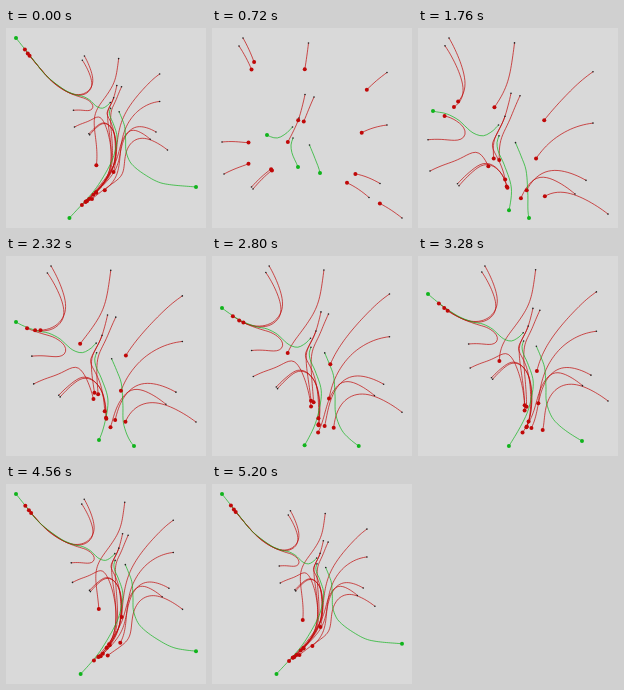
Animation of 200 by 200 pixels, one loop 5.28 s. Source, as an HTML page:

```html
<!DOCTYPE html>
<html lang="en">
<head>
<meta charset="utf-8">
<title>Pursuit and escape</title>
<style>
  html, body { margin: 0; width: 100%; height: 100%; overflow: hidden; background: #d9d9d9; }
  svg { display: block; width: 100%; height: 100%; }
  path { fill: none; stroke-width: .7; }
</style>
</head>
<body>
<svg id="stage" viewBox="0 0 200 200"></svg>
<script>
const STEP_MS = 80, STATES = 66, CHASE_SPEED = 3.32;
const LOW = 10, SPAN = 180;
const RED = '#c00808', GREEN = '#10b41c';

// Escape routes: [step, x, y]
const routes = [
  [[0, 80.5, 99], [2.4, 74, 105.5], [5.1, 65, 110], [8, 55, 107], [10.9, 47, 100], [13.4, 40, 93.5],
   [17.2, 28, 87.3], [21, 15, 84.6], [28, -7.4, 74.6], [40, -42.5, 47.3], [48, -61, 24.6], [65, -100, -24.5]],
  [[0, 81, 110], [2, 79, 117], [4.4, 80.3, 126], [8, 86, 139], [14.9, 93.3, 163],
   [21, 91, 186], [28, 83.6, 210.7], [40, 62, 250], [48, 45, 273.5], [65, 2.3, 320.3]],
  [[0, 97.5, 117], [4, 103, 130.5], [8, 108, 145], [14.5, 109.8, 169], [21, 111, 194],
   [28, 122, 217.6], [40, 156.4, 243.3], [48, 183, 254.5], [65, 244.6, 261]]
];

const chaserStarts = [
  [31, 10], [27, 18], [96.5, 15], [175, 44.5], [175, 97], [10, 114], [12, 146], [93, 66.5],
  [102, 69], [87, 90], [39.5, 159], [41, 161], [168, 155.5], [157, 169.5], [190, 190]
];

// Cubic Hermite curve through timed points
function pointAt(route, t) {
  let i = 0;
  while (i < route.length - 2 && t > route[i + 1][0]) i++;
  const a = route[i], b = route[i + 1], span = b[0] - a[0], u = (t - a[0]) / span;
  const slope = (k, axis) => {
    const p = route[Math.max(k - 1, 0)], q = route[Math.min(k + 1, route.length - 1)];
    return (q[axis] - p[axis]) / (q[0] - p[0]);
  };
  return [1, 2].map(axis =>
    a[axis] * (1 + 2 * u) * (1 - u) ** 2 +
    b[axis] * u * u * (3 - 2 * u) +
    span * u * (1 - u) * (slope(i, axis) * (1 - u) - slope(i + 1, axis) * u));
}

// A chaser is drawn to every runner with strength 1 / distance
function chase([x, y], runners) {
  let dx = 0, dy = 0;
  for (const [rx, ry] of runners) {
    const d2 = (rx - x) ** 2 + (ry - y) ** 2 || 1e-6;
    dx += (rx - x) / d2;
    dy += (ry - y) / d2;
  }
  const k = CHASE_SPEED / (Math.hypot(dx, dy) || 1);
  return [x + dx * k, y + dy * k];
}

const runnerTrails = routes.map(r => Array.from({ length: STATES }, (_, s) => pointAt(r, s)));
const chaserTrails = chaserStarts.map(start => {
  const trail = [start];
  for (let s = 0; s < STATES - 1; s++) trail.push(chase(trail[s], runnerTrails.map(t => t[s])));
  return trail;
});

const stage = document.getElementById('stage');
function add(tag, attrs) {
  const el = document.createElementNS('http://www.w3.org/2000/svg', tag);
  for (const name in attrs) el.setAttribute(name, attrs[name]);
  return stage.appendChild(el);
}

const agents = [
  ...chaserTrails.map(trail => ({ trail, color: RED })),
  ...runnerTrails.map(trail => ({ trail, color: GREEN }))
];
for (const a of agents) a.line = add('path', { stroke: a.color });
for (const a of agents) a.origin = add('circle', { r: .8, fill: '#222' });
for (const a of agents) a.head = add('circle', { r: 2, fill: a.color });

// Maps the extent of all trails so far onto the stage
function fitAxis(state, axis) {
  let min = Infinity, max = -Infinity;
  for (const { trail } of agents) {
    for (let s = 0; s <= state; s++) {
      min = Math.min(min, trail[s][axis]);
      max = Math.max(max, trail[s][axis]);
    }
  }
  return v => LOW + (v - min) * SPAN / (max - min);
}

function place(circle, [x, y]) {
  circle.setAttribute('cx', x);
  circle.setAttribute('cy', y);
}

function draw(state) {
  const fitX = fitAxis(state, 0), fitY = fitAxis(state, 1);
  for (const { trail, line, origin, head } of agents) {
    const points = trail.slice(0, state + 1).map(([x, y]) => [fitX(x), fitY(y)]);
    line.setAttribute('d', 'M' + points.map(p => p.map(v => v.toFixed(2)).join(' ')).join('L'));
    place(origin, points[0]);
    place(head, points[state]);
  }
}

// The loop opens on the final state, then restarts the chase
const startTime = performance.now();
let shown = -1;
function tick() {
  const step = Math.floor((performance.now() - startTime) / STEP_MS);
  const state = (step + STATES - 1) % STATES;
  if (state !== shown) draw(shown = state);
  requestAnimationFrame(tick);
}
tick();
</script>
</body>
</html>
```
